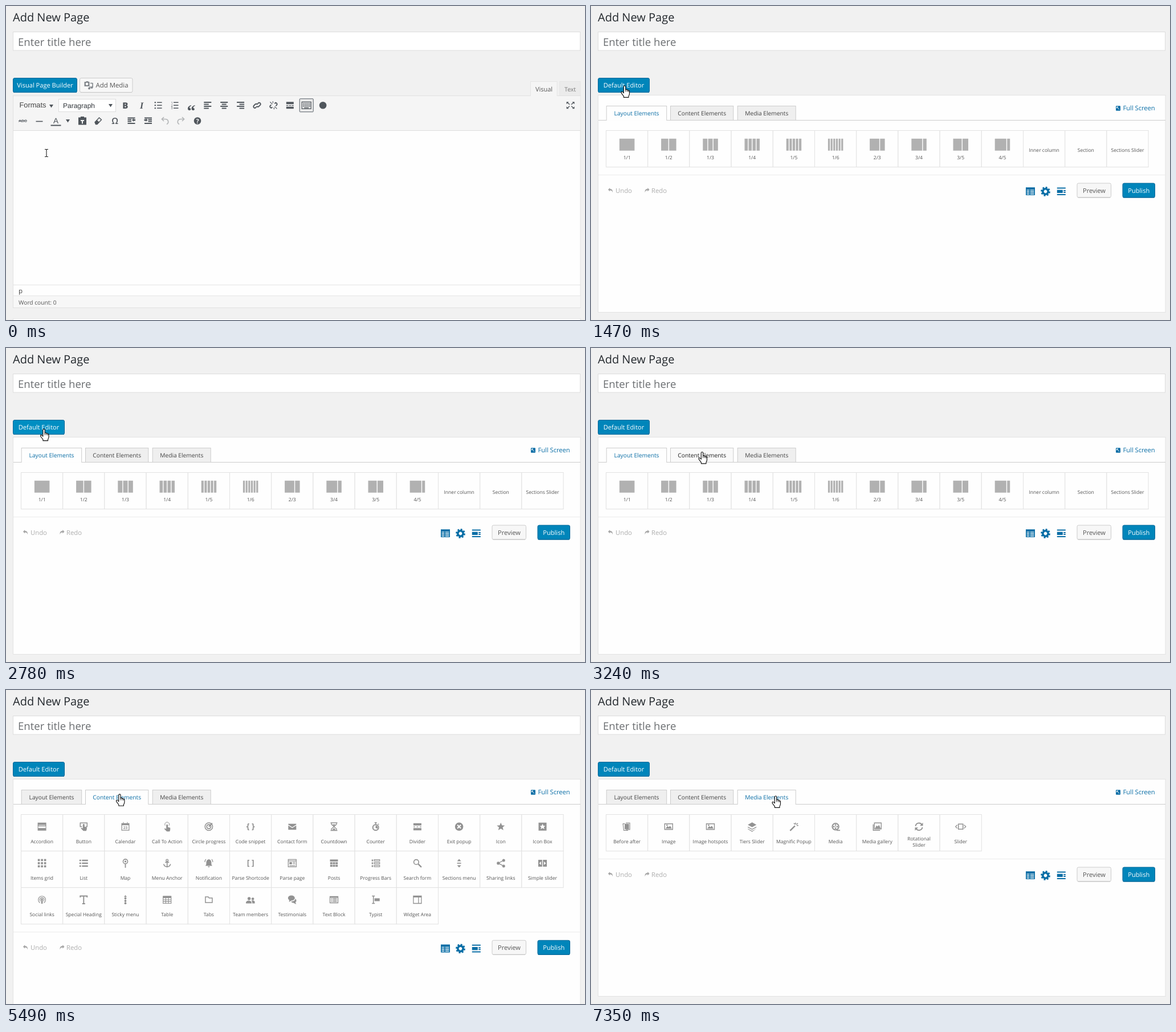
Animation, 1016 px wide and 551 px high, one loop 8 s. Source, as an HTML page:

```html
<!DOCTYPE html>
<html lang="en">
<head>
<meta charset="utf-8">
<title>Page builder</title>
<style>
html, body { margin: 0; width: 100%; height: 100%; overflow: hidden; background: #f1f1f1; }
svg { display: block; width: 1016px; height: 551px; }
text { font-family: "Open Sans", "Noto Sans", sans-serif; text-rendering: geometricPrecision; white-space: pre; }
text.arial { font-family: "Liberation Sans", Arial, sans-serif; }
text.serif { font-family: "Liberation Serif", serif; }
</style>
</head>
<body>
<svg viewBox="0 0 1016 551"><g id="scene"></g><g id="pointer"></g></svg>
<script>
const LOOP = 8000, BLUE = '#0a6ea6', DARK = '#50565c';

// Markup helpers
const text = (x, y, size, fill, s, anchor = 'start', extra = '') =>
  `<text x="${x}" y="${y}" font-size="${size}" fill="${fill}" text-anchor="${anchor}" ${extra}>${s}</text>`;
const rect = (x, y, w, h, fill, stroke = 'none', r = 0) =>
  `<rect x="${x}" y="${y}" width="${w}" height="${h}" fill="${fill}" stroke="${stroke}" rx="${r}"/>`;
const hline = (x, y, w, color) => rect(x, y, w, 1, color);
const at = (x, y, s, color = DARK, scale = 1) =>
  `<g transform="translate(${x} ${y}) scale(${scale})" color="${color}">${s}</g>`;
const fill = d => `<path d="${d}" fill="currentColor" fill-rule="evenodd"/>`;
const line = (d, w = 1.5) => `<path d="${d}" fill="none" stroke="currentColor" stroke-width="${w}"/>`;
const dot = (x, y, r) => `<circle cx="${x}" cy="${y}" r="${r}" fill="currentColor"/>`;
const ring = (r, w = 1.5, x = 0, y = 0, extra = '') =>
  `<circle cx="${x}" cy="${y}" r="${r}" fill="none" stroke="currentColor" stroke-width="${w}" ${extra}/>`;
const glyph = (s, size, y, extra = '') => text(0, y, size, 'currentColor', s, 'middle', extra);
const flip = s => `<g transform="scale(-1 1)">${s}</g>`;

const rows = 'M-6-5H6M-6-1.7H6M-6 1.7H6M-6 5H6';
const undoArrow = fill('M-7-2L-2-7V-4C4-4 6 0 5 6C4 1 2 0-2 0V3z');
const curvedUndo = line('M-5.5-3H0C7-3 7 4 3 6', 1.7) + line('M-2-6.5L-5.5-3L-2 .5', 1.7);
const indent = line('M-6.5-5h13M0-2h6.5M0 1h6.5M-6.5 4.5h13', 1.8) + fill('M-7-2.8h3v-1.7l3 3-3 3V0h-3z');
const picture = line('M-7-5H7V5H-7z', 1.4) + fill('M-5.5 3.5L-2-1 0 1 2.5-1.5 5.5 3.5z') + dot(-3, -2.5, 1.2);
const pressHand = fill('M-1.5-4q1.5-1.5 3 0V0l4 1v3.5l-1 3h-5L-5 3l1-1 2.5 1z');

const layouts = [['1/1', [1]], ['1/2', [1, 1]], ['1/3', [1, 1, 1]], ['1/4', [1, 1, 1, 1]],
  ['1/5', Array(5).fill(1)], ['1/6', Array(6).fill(1)], ['2/3', [2, 1]], ['3/4', [3, 1]],
  ['3/5', [3, 2]], ['4/5', [4, 1]], ['Inner column'], ['Section'], ['Sections Slider']];

const columns = parts => {
  const total = parts.reduce((a, b) => a + b), gap = 1.4, unit = (26.5 - gap * (parts.length - 1)) / total;
  let x = -13.2;
  return parts.map(p => {
    const s = rect(x, -7, p * unit, 21, '#b1b1b1');
    x += p * unit + gap;
    return s;
  }).join('');
};

const content = [
  ['Accordion', fill('M-7.5-7H7.5V7H-7.5zM-6-3H6V-2H-6zM-6.5-.5H6.5V2.5H-6.5z')],
  ['Button', line('M-3 0H-6V-6.5H6V0H4') + pressHand],
  ['Calendar', fill('M-7-6H-4V-8H-3V-6H3V-8H4V-6H7V7H-7zM-5.7-2.5V5.7H5.7V-2.5z') + glyph('23', 6.5, 4.5, 'font-weight="700"')],
  ['Call To Action', `<g transform="translate(0 1)">${pressHand}</g>` + line('M-3.5-2A4 4 0 1 1 3.5-2', 1)],
  ['Circle progress', ring(6.7) + ring(3.6, 1.8) + line('M0 0L6-6', 2)],
  ['Code snippet', glyph('{ }', 14, 4.5, 'font-weight="700"')],
  ['Contact form', fill('M-7-5H7V-3.5L0 1-7-3.5zM-7-2L0 2.5 7-2V5.5H-7z')],
  ['Countdown', line('M-6-6.8H6M-6 6.8H6M-4.5-6V-4L4.5 4V6.5M4.5-6V-4L-4.5 4V6.5', 1.4) + fill('M-3-4H3L0-1zM-3.5 6L0 2.5 3.5 6z')],
  ['Counter', ring(5, 2, 0, 1.5) + line('M-2-7H2M0-7V-4M4-5L5.5-3.5M0 2L2-1') + fill('M0 1.5V-2A3.5 3.5 0 0 1 2.5 4z')],
  ['Divider', fill('M-7-6H7V-2H-7zM-7 2.5H7V6.5H-7z') + line('M-7 .3H7', 1.2).replace('/>', ' stroke-dasharray="3 2.5"/>')],
  ['Exit popup', dot(0, 0, 7.3) + '<path d="M-3-3L3 3M3-3L-3 3" stroke="#fff" stroke-width="2"/>'],
  ['Icon', fill('M0-7L2-2.2 7-2 3.2 1.3 4.5 6.3 0 3.5-4.5 6.3-3.2 1.3-7-2-2-2.2z')],
  ['Icon Box', fill('M-7-7H7V7H-7zM0-5L1.5-1.6 5-1.4 2.3 1 3.2 4.5 0 2.5-3.2 4.5-2.3 1-5-1.4-1.5-1.6z')],
  ['Items grid', [-5.5, 0, 5.5].map(x => [-5.5, 0, 5.5].map(y => rect(x - 1.8, y - 1.8, 3.6, 3.6, 'currentColor')).join('')).join('')],
  ['List', line('M-7.5-5h3M-3-5H7.5M-7.5 0h3M-3 0H7.5M-7.5 5h3M-3 5H7.5', 2.5)],
  ['Map', ring(4, 1.6, 0, -3) + dot(0, -3, 1.7) + line('M0 1.5V8', 1.8)],
  ['Menu Anchor', ring(1.8, 1.4, 0, -5) + line('M0-3V6.5M-3.5-1.5H3.5M-6 1.5Q-5 6 0 6.5Q5 6 6 1.5', 1.6)],
  ['Notification', fill('M0-7Q4.5-6 4.5-1V2L6 4.5H-6L-4.5 2V-1Q-4.5-6 0-7zM-2 5.5H2Q0 9-2 5.5z') + line('M-5-7Q-7-5-7-2M5-7Q7-5 7-2', 1.2)],
  ['Parse Shortcode', glyph('[ ]', 14, 4.5, 'font-weight="700"')],
  ['Parse page', line('M-7-6.5H7V6.5H-7zM-7-4H7M-5 4.5H5M1-1.5H5M1 1H5', 1.3) + rect(-5, -2, 4.5, 4, 'currentColor')],
  ['Posts', fill('M-7-6.5H7V-3H-7z') + [-4.7, 0, 4.7].map(x => [0, 4.5].map(y => rect(x - 2, y - 1.7, 4, 3.5, 'currentColor')).join('')).join('')],
  ['Progress Bars', line('M-7-5h2.5M-7 0h2.5M-7 5h2.5', 3) + line('M-2.5-6.2H7V-3.8H-2.5zM-2.5-1.2H7V1.2H-2.5zM-2.5 3.8H7V6.2H-2.5z', 1.2)],
  ['Search form', ring(4.3, 1.6, -2, -2) + line('M1.5 1.5L7 7', 2.2)],
  ['Sections menu', fill('M0-7.5L3.5-3.5H-3.5zM0 7.5L3.5 3.5H-3.5z') + line('M-3.5 0H3.5', 1.7)],
  ['Sharing links', line('M5-5L-4.5 0 5 5', 1.4) + dot(5, -5, 2.5) + dot(-4.5, 0, 2.6) + dot(5, 5, 2.5)],
  ['Simple slider', fill('M-7.5-6H-.7V6H-7.5zM.7-6H7.5V6H.7zM-6 0L-2.5-3V3zM6 0L2.5-3V3z')],
  ['Social links', line('M-3.5 5.5A6.4 6.4 0 1 1 3.5 5.5M-2.5 2.5A3.6 3.6 0 1 1 2.5 2.5', 1.2) + dot(0, -.5, 1.8) + line('M0 1V7', 2.5)],
  ['Special Heading', line('M-6-4V-6.5H6V-4M0-6.5V7M-2.5 7H2.5', 1.9)],
  ['Sticky menu', fill('M0-8L2.5-5H-2.5z') + dot(0, -2.5, 1.9) + dot(0, 2, 1.9) + dot(0, 6.2, 1.9)],
  ['Table', line('M-7-6H7V6.5H-7zM-7 0H7M-7 3.2H7M-2.3-4V6M2.3-4V6', 1.2) + rect(-7, -6.5, 14, 3.5, 'currentColor')],
  ['Tabs', line('M-6-5H-1L.5-3H6V5H-6z')],
  ['Team members', dot(-2.5, -2, 2.7) + dot(4, -1.5, 2.3) + fill('M-8 6.5V4Q-5 .5-1 2Q2 2.5 2 6.5zM3 6.5Q3 3 1.5 1.5Q7 .5 7.5 4V6.5z')],
  ['Testimonials', '<ellipse cx="-1.5" cy="-3" rx="6" ry="4.5" fill="currentColor"/>' + fill('M-5-1L-5.5 4-1 1zM5.5-2Q9 2 5.5 4.5L7 8 2 5.5Q-1 5.5-2 3Q5 3 5.5-2z')],
  ['Text Block', line('M-7-5.5H7V5.5H-7zM-2-2H5M-2 .5H5M-2 3H5M-5-2h2M-5 .5h2M-5 3h2', 1.3) + rect(-7, -6, 14, 2.5, 'currentColor')],
  ['Typist', line('M-6.5-6.5h5M-6.5 6.5h5M-4-6.5v13', 1.6) + rect(-2, -2.5, 9, 5, 'currentColor')],
  ['Widget Area', line('M-7-6.5H7V6.5H-7zM2-5V6', 1.3) + rect(-7, -7, 14, 3, 'currentColor')],
];

const media = [
  ['Before after', line('M-2-6.5H5V5H-2M-4-5.5L-7-5-5.5 6.5H2', 1.2) + rect(-4, -5, 7.5, 9.5, 'currentColor')],
  ['Image', picture], ['Image hotspots', picture],
  ['Tiers Slider', fill('M0-7.5L7.5-3.2 0 1-7.5-3.2zM-7.5 0L0 4 7.5 0V1.5L0 5.5-7.5 1.5zM-7.5 3.5L0 7.5 7.5 3.5 0 9-7.5 4.5z')],
  ['Magnific Popup', line('M-6.5 7L2-1.5', 2.4) + line('M4.5-3.5L7-6M3-7V-4M5-2H8M0-6L2-4', 1.5)],
  ['Media', ring(5.7, 2) + [[0, -3], [0, 3], [-3, 0], [3, 0]].map(p => dot(...p, 1.4)).join('') + dot(0, 0, .9) + line('M2 6.5H8', 1.7)],
  ['Media gallery', line('M-5-6.5H7V4H-5zM-7-4V6.5H5', 1.4) + fill('M-4 3L-1-2 1 0 3-3 6 3z')],
  ['Rotational|Slider', line('M-6-1A6 6 0 0 1 5-3.5M6 1A6 6 0 0 1-5 3.5', 1.8) + fill('M7-7V-1.5H1.5zM-7 7V1.5H-1.5z')],
  ['Slider', line('M-4-4.5H4V4.5H-4z', 1.6) + line('M-6-3L-9 0-6 3M6-3L9 0 6 3', 1.3)],
];

const tabs = [
  { x: 27, w: 106, label: 'Layout Elements', items: layouts, shift: 0 },
  { x: 139.3, w: 110.8, label: 'Content Elements', items: content, shift: 128.3 },
  { x: 257, w: 102.5, label: 'Media Elements', items: media, shift: 0 },
];

const primary = (x, y, w, label, state = '') => {
  const down = state === 'press' ? 1 : 0;
  const color = { hover: '#008ec2', press: '#0073aa' }[state] || '#0085ba';
  return rect(x + .5, y + .5 + down, w - 1, 25, color, '#006799', 2.5) +
    hline(x + 1, y + 25 + down, w - 2, '#006799') +
    text(x + w / 2, y + 17 + down, 11.1, '#fff', label, 'middle');
};
const secondary = (x, y, w) =>
  rect(x + .5, y + .5, w - 1, 25, '#f7f7f7', '#ccc', 2.5) + hline(x + 2, y + 25, w - 4, '#c4c4c4');

const header = text(12, 27, 20, '#23282d', 'Add New Page') +
  rect(12.5, 45.5, 995, 32.5, '#fff', '#ddd') + text(21, 70, 18.6, '#6c6f72', 'Enter title here');

const toolbar = () => {
  const caret = fill('M-3.5-2.5H3.5L0 3z');
  const letters = (s, size, y, extra) => glyph(s, size, y, extra);
  const bullets = [-5, 0, 5].map(y => dot(-5.3, y, 1.2)).join('');
  const digits = [-2.8, 2.2, 7.2].map((y, i) => text(-6.5, y, 5.5, DARK, i + 1)).join('');
  const listLines = line('M-2-5H6.5M-2 0H6.5M-2 5H6.5', 1.4);
  const align = (a, b) => line(`M-6.5-5.3h13M${a}-1.8h${b}M-6.5 1.7h13M${a} 5.2h${b}`, 1.9);
  const chain = line('M-1.2 2.8L-3 4.6A2.6 2.6 0 0 1-6 1L-3-2Q-1-3.5 1-1.5M1.2-2.8L3-4.6A2.6 2.6 0 0 1 6-1L3 2Q1 3.5-1 1.5', 1.9);
  const broken = line('M-2 3L-3.5 4.6A2.6 2.6 0 0 1-6 1L-4-1M2-3L3.5-4.6A2.6 2.6 0 0 1 6-1L4 1', 1.9) + line('M-6-6L-2-2M2 2L6 6M-1-7V-4M1 7V4', 1.2);
  const keys = line('M-8-6H8V6H-8z', 1.2) + [-3.3, -.7, 1.9].map(y =>
    `<path d="M-6 ${y}H6.5" stroke="currentColor" stroke-width="1.6" stroke-dasharray="1.7 1"/>`).join('') + line('M-4 4.3H4', 1.3);
  const first = [
    letters('B', 15, 5.5, 'font-weight="800"'),
    letters('I', 16, 5.5, 'class="serif" font-weight="700" font-style="italic"'),
    bullets + listLines, digits + listLines,
    letters('“', 30, 20, 'class="serif" font-weight="700"'),
    align(-6.5, 8.5), align(-4, 8), align(-2, 8.5), chain, broken,
    fill('M-6.5-6H6.5V-2H-6.5zM-6.5 2.5H6.5V6H-6.5z') + line('M-6.5 .3h3.5M-1.7 .3h3.5M3 .3h3.5', 1.3),
    rect(-12, -11.5, 24, 23, '#ebebeb', '#555d66', 1) + keys, dot(0, 0, 6.3),
  ];
  const full = line('M-6-5.5L6 5.5M6-5.5L-6 5.5', 1.4) + fill('M-7-6H-3L-7-2zM7-6H3L7-2zM-7 6H-3L-7 2zM7 6H3L7 2z') + rect(-1.8, -1.8, 3.6, 3.6, '#f5f5f5');
  const paste = fill('M-7-6H-3V-7.5H3V-6H7V7H-7zM-3-1.5V.5H-1V5H1V.5H3V-1.5z');
  const eraser = line('M-6 2.5L1.5-5.5 5.5-2-2 6H-4.5z', 1.4) + fill('M-6 2.5L-2.5-1.5 1.5 2.2-2 6H-4.5z');
  const help = dot(0, 0, 6.3) + text(0, 4, 11, '#f5f5f5', '?', 'middle', 'font-weight="700"');
  const second = [
    [29.5, letters('ABC', 7, 2.5, 'class="arial"') + line('M-7.5 0H7.5', 1)], [58.5, line('M-6 1H6', 1.6)],
    [87.5, letters('A', 13.5, 4, 'class="arial"') + line('M-9 8H9', 2)], [108.5, caret],
    [134, paste], [162, eraser], [191, letters('Ω', 15, 5.5, 'font-weight="600"')],
    [220, flip(indent)], [249.5, indent], [279, curvedUndo, '#b4b6b8'], [307, flip(curvedUndo), '#b4b6b8'], [336, help],
  ];
  return text(23.5, 177.5, 12.8, '#444', 'Formats', 'start', 'class="arial"') + at(79.5, 175.5, caret) +
    rect(92.5, 163.5, 100, 22, '#fff', '#ddd') + text(100, 178.5, 12, '#32373c', 'Paragraph', 'start', 'class="arial"') +
    at(183.5, 174.5, caret) + first.map((s, i) => at(209.3 + i * 28.9, 174.3, s)).join('') +
    at(990.5, 174.3, full) + second.map(([x, s, c]) => at(x, 201.5, s, c)).join('');
};

const editor = state => header + primary(12, 126, 113, 'Visual Page Builder', state) + secondary(129, 126, 93.5) +
  at(145, 139, fill('M-7.5-6H-5L-4-7H-1L0-6H1.5V2H-7.5zM-3-4.5A2.3 2.3 0 1 0-3 .2A2.3 2.3 0 1 0-3-4.5z') +
    dot(1, 5.5, 1.9) + dot(5.5, 4, 1.9) + line('M2.5 5.5V2M7-4V4M3-3.5H7', 1.6), '#82878c') +
  text(157.5, 143.3, 11.4, '#555', 'Add Media') +
  rect(971.5, 132.5, 36.5, 25, '#ebebeb', '#e5e5e5') + text(990, 150, 10.4, '#777', 'Text', 'middle') +
  rect(12.5, 157.5, 995.5, 372, '#fefefe', '#e1e1e1') + rect(13, 158, 994.5, 60, '#f5f5f5') + hline(13, 218, 995, '#ddd') +
  rect(920.5, 132.5, 46.5, 25, '#f5f5f5', '#e5e5e5') + rect(921, 157, 45.5, 2, '#f5f5f5') +
  text(944, 150, 11, '#555', 'Visual', 'middle') + toolbar() +
  hline(13, 489, 995, '#e3e3e3') + text(22, 504, 11.5, '#444', 'p') +
  rect(13, 509, 994.5, 20, '#f7f7f7') + hline(13, 508, 995, '#e5e5e5') + text(22, 524, 10.2, '#555', 'Word count: 0') +
  rect(12.5, 548.5, 995.5, 10, '#fff', '#e5e5e5');

const cell = ([label, art], i) => {
  const x = 26.5 + (i % 13) * 73.2, y = 218.5 + Math.floor(i / 13) * 64.1, mid = x + 36.6;
  const icon = Array.isArray(art) ? columns(art) : art || '';
  const lines = label.split('|');
  const base = y + (art ? 50.5 : 37) - (lines.length - 1) * 5.5;
  return rect(x, y, 73.2, 64.1, '#fefefe', '#e2e2e2') + at(mid, y + 21.3, icon, '#929292') +
    lines.map((s, k) => text(mid, base + k * 11, 8.55, '#555', s, 'middle')).join('');
};

const actions = dy => {
  const gear = ring(4.7, 3.6) + ring(6.9, 3, 0, 0, 'stroke-dasharray="2.9 2.52"');
  const grid = line('M-7.2-6H7.2V6H-7.2zM-7-.7H7M-7 2.8H7M-1-3V6', 1.6) + rect(-8, -6.8, 16, 4, 'currentColor');
  const block = line('M-7.5-5.8H7.5M-7.5 5.8H7.5M4-1.4H7.5M4 1.6H7.5', 2) + rect(-7.5, -2.6, 10, 5.4, 'currentColor');
  return `<g transform="translate(0 ${dy})">` + hline(13, 296, 995, '#ececec') +
    at(34.5, 323.5, undoArrow, '#a5a5a5', .65) + text(43, 327.8, 11.3, '#adadad', 'Undo') +
    at(98, 323.5, flip(undoArrow), '#a5a5a5', .65) + text(106, 327.8, 11.3, '#adadad', 'Redo') +
    at(771, 325.3, grid, BLUE) + at(797.5, 325.5, gear, BLUE) + at(825.3, 325.3, block, BLUE) +
    secondary(852.5, 310.5, 60.5) + text(883, 327.8, 11.1, '#555', 'Preview', 'middle') +
    primary(932.5, 310.5, 57.5, 'Publish') + '</g>';
};

const builder = (active, hovered, buttonState) => {
  const { items, shift } = tabs[active];
  return header + primary(12, 126, 91, 'Default Editor', buttonState) +
    rect(12.5, 156.5, 995.5, 381 + shift, '#fefefe', '#e3e3e3') + hline(13, 200, 995, '#ccc') +
    tabs.map(({ x, w, label }, i) => {
      const on = i === active, over = i === hovered;
      return rect(x + .2, 175.5, w - .5, 25, on ? '#fefefe' : over ? '#f9f9f9' : '#efefef', '#ccc') +
        (on ? rect(x + .7, 199.5, w - 1.5, 2, '#fefefe') : '') +
        text(x + w / 2, 192.3, 10.22, on ? BLUE : over ? '#222' : '#444', label, 'middle');
    }).join('') +
    at(925, 179.5, rect(-4, -4.3, 8, 8.6, 'currentColor', 'none', 1) +
      '<path d="M-2-2.2L2 2.2M-2.5 0V-2.5H0" stroke="#fff" fill="none"/>', BLUE) +
    text(933.5, 183.3, 11.15, BLUE, 'Full Screen') + items.map(cell).join('') + actions(shift);
};

const outlined = (d, extra = '') => `<path d="${d}" fill="#fff" stroke="#111" stroke-width="1.15" stroke-linejoin="round"/>${extra}`;
const pointers = {
  beam: line('M-3-6.5H-1L0-5.5 1-6.5H3M0-5.5V5.5M-3 6.5H-1L0 5.5 1 6.5H3', 1.1),
  arrow: outlined('M0 0V15.5L3.6 12.3 6 17.6 8.2 16.6 5.9 11.4H10.7z'),
  hand: outlined('M-1.7 2.2A1.7 1.7 0 0 1 1.7 2.2V7.3Q3.4 6.2 4.4 8Q5.9 7.2 6.7 8.9Q8.5 8.6 8.5 10.6V14Q8.5 16.5 7 18.5V20.8H-1.6V18.8L-5.6 13.4Q-6.5 11.4-5 10.8Q-3.5 10.7-1.7 13.2z',
    '<path d="M1.7 7V11M4.4 8V11M6.7 9V11.5" stroke="#111" stroke-width=".9"/>'),
};

// Pointer moves: start, end, number of steps, destination, sideways bow
const moves = [
  { from: 70, to: 690, steps: 9, end: [60, 145], bow: 0 },
  { from: 920, to: 1000, steps: 2, end: [59, 139.5], bow: 0 },
  { from: 2780, to: 3240, steps: 7, end: [195, 182], bow: 0 },
  { from: 5490, to: 6110, steps: 9, end: [324, 185.5], bow: 3 },
];
const ease = p => p * p * (3 - 2 * p);

function pointerAt(t) {
  let pos = [71, 258];
  for (const { from, to, steps, end, bow } of moves) {
    if (t < from) break;
    const step = Math.min(steps, 1 + Math.floor((t - from) / (to - from) * (steps - 1) + 1e-6));
    const p = ease(step / steps);
    pos = pos.map((v, i) => v + (end[i] - v) * p + (i ? bow * Math.sin(Math.PI * p) : 0));
  }
  return pos;
}

const sceneNode = document.getElementById('scene'), pointerNode = document.getElementById('pointer');
let lastKey = '';

function render(t) {
  const [x, y] = pointerAt(t);
  const building = t >= 1455;
  const active = t < 3870 ? 0 : t < 7350 ? 1 : 2;
  const onButton = y >= 126 && y < 152 && x >= 12 && x < (building ? 103 : 125);
  const tab = building && y >= 175 && y < 201 ? tabs.findIndex(b => x >= b.x && x < b.x + b.w) : -1;
  const pressed = t >= 1380 && !building;
  const settling = building && t < 1700;
  const state = pressed ? 'press' : onButton && !settling ? 'hover' : '';
  const key = [building, active, tab, state].join();
  if (key !== lastKey) {
    lastKey = key;
    sceneNode.innerHTML = building ? builder(active, tab, state) : editor(state);
  }
  const kind = onButton || tab >= 0 ? 'hand' : !building && y > 218 ? 'beam' : 'arrow';
  pointerNode.innerHTML = at(x, y, pointers[kind], '#222');
}

const start = performance.now();
function tick() {
  render((performance.now() - start) % LOOP);
  requestAnimationFrame(tick);
}
tick();
</script>
</body>
</html>
```
